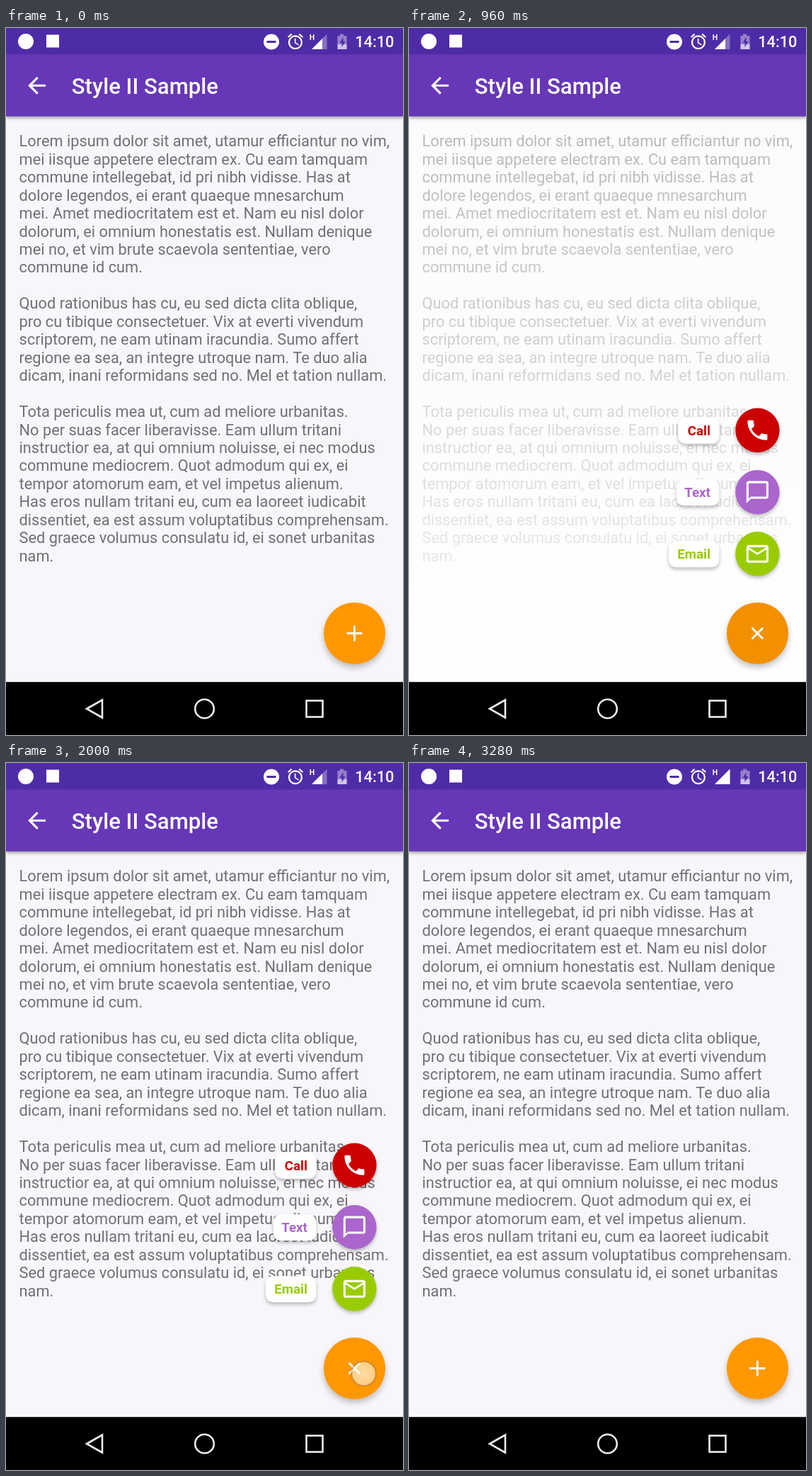
An HTML page that plays this animation: 561 by 998 pixels, repeating every 3.76 s.

```html
<!DOCTYPE html>
<html lang="en">
<head>
<meta charset="utf-8">
<title>Floating menu</title>
<style>
html, body { margin: 0; width: 100%; height: 100%; overflow: hidden; background: #f8f6fa; }
svg { display: block; width: 561px; height: 998px; font-family: Roboto, sans-serif; }
.bar { filter: drop-shadow(0 2px 2.5px rgba(0,0,0,.4)); }
.fab { filter: drop-shadow(0 5px 4px rgba(0,0,0,.24)); }
.lift { filter: drop-shadow(0 3px 2.5px rgba(0,0,0,.26)); }
.nav { fill: none; stroke: #ececec; stroke-width: 2.6; }
</style>
</head>
<body>
<svg viewBox="0 0 561 998">
  <defs>
    <linearGradient id="fade" x2="0" y2="1">
      <stop stop-color="#fff" stop-opacity=".49"/>
      <stop offset="1" stop-color="#fff" stop-opacity=".93"/>
    </linearGradient>
    <radialGradient id="dot">
      <stop stop-color="#fff" stop-opacity=".66"/>
      <stop offset=".8" stop-color="#fff" stop-opacity=".52"/>
      <stop offset=".87" stop-color="#a87c50" stop-opacity=".6"/>
      <stop offset="1" stop-color="#a87c50" stop-opacity="0"/>
    </radialGradient>
  </defs>
  <rect width="561" height="998" fill="#f8f6fa"/>
  <g id="copy" font-size="21.82" fill="#727074"></g>
  <rect id="veil" y="124" width="561" height="800" fill="url(#fade)"/>

  <rect class="bar" y="37" width="561" height="87.7" fill="#6637b6"/>
  <rect width="561" height="37.4" fill="#4f2ca7"/>
  <g fill="#fff">
    <circle cx="28" cy="19" r="11"/>
    <rect x="57" y="9.5" width="18" height="18"/>
    <circle cx="375" cy="19.5" r="11"/>
    <rect x="368.5" y="18" width="13" height="3" fill="#4f2ca7"/>
    <path transform="translate(395.6 5.8) scale(1.11)" d="M22 5.72l-4.6-3.86-1.29 1.53 4.6 3.86L22 5.72zM7.88 3.39L6.6 1.86 2 5.71l1.29 1.53 4.59-3.85zM12.5 8H11v6l4.75 2.85.75-1.23-4-2.37V8zM12 4c-4.97 0-9 4.03-9 9s4.02 9 9 9c4.97 0 9-4.03 9-9s-4.03-9-9-9zm0 16c-3.87 0-7-3.13-7-7s3.13-7 7-7 7 3.13 7 7-3.13 7-7 7z"/>
    <text x="428.8" y="17" font-size="10.5" font-weight="700">H</text>
    <path d="M432 30L453.5 8.5V30z" opacity=".32"/>
    <path id="signal"/>
    <path d="M468.5 11h3.500V8.500h5V11h4.500V30h-13z" opacity=".4"/>
    <path d="M468.500 23h13v7h-13z" opacity=".55"/>
    <path d="M476.500 13l-5 8h3v6l5-8h-3z" fill="#4f2ca7"/>
    <text x="548.5" y="27" font-size="21.82" font-weight="500" text-anchor="end">14:10</text>
    <path transform="translate(24.900 62.600) scale(1.558)" d="M20 11H7.83l5.590-5.590L12 4l-8 8 8 8 1.410-1.410L7.830 13H20z"/>
    <text x="92.800" y="93" font-size="31.160" font-weight="500">Style II Sample</text>
  </g>

  <g id="menu"></g>
  <circle class="fab" cx="492.500" cy="854.500" r="43.600" fill="#ff9800"/>
  <circle id="press" cx="492.500" cy="854.500" r="43.600"/>
  <path id="plus" d="M-11 0H11M0-11V11" stroke="#fff" stroke-width="2.900"/>
  <circle id="touch" r="19.500" fill="url(#dot)"/>

  <rect y="923.200" width="561" height="75"/>
  <path class="nav" d="M114 961L136 948.500V973.500z"/>
  <circle class="nav" cx="280.500" cy="961" r="13.300"/>
  <rect class="nav" x="424.500" y="949.500" width="23" height="23"/>
</svg>
<script>
const $ = id => document.getElementById(id);
const LOOP = 3760, STEP = 80;

const lines = `Lorem ipsum dolor sit amet, utamur efficiantur no vim,
mei iisque appetere electram ex. Cu eam tamquam
commune intellegebat, id pri nibh vidisse. Has at
dolore legendos, ei erant quaeque mnesarchum
mei. Amet mediocritatem est et. Nam eu nisl dolor
dolorum, ei omnium honestatis est. Nullam denique
mei no, et vim brute scaevola sententiae, vero
commune id cum.

Quod rationibus has cu, eu sed dicta clita oblique,
pro cu tibique consectetuer. Vix at everti vivendum
scriptorem, ne eam utinam iracundia. Sumo affert
regione ea sea, an integre utroque nam. Te duo alia
dicam, inani reformidans sed no. Mel et tation nullam.

Tota periculis mea ut, cum ad meliore urbanitas.
No per suas facer liberavisse. Eam ullum tritani
instructior ea, at qui omnium noluisse, ei nec modus
commune mediocrem. Quot admodum qui ex, ei
tempor atomorum eam, et vel impetus alienum.
Has eros nullam tritani eu, cum ea laoreet iudicabit
dissentiet, ea est assum voluptatibus comprehensam.
Sed graece volumus consulatu id, ei sonet urbanitas
nam.`.split('\n');
$('copy').innerHTML = lines.map((s, i) =>
  `<text x="18.500" y="${167.300 + i * 25.450}">${s}</text>`).join('');

// Label, colour, centre y, pill width, icon
const items = [
  ['Email', '#99cc00', 742.3, 71.5, 'M20 4H4c-1.1 0-2 .9-2 2v12c0 1.1.9 2 2 2h16c1.1 0 2-.9 2-2V6c0-1.1-.9-2-2-2zm0 14H4V8l8 5 8-5v10zm-8-7L4 6h16l-8 5z'],
  ['Text', '#aa66cc', 655.2, 60.5, 'M20 2H4c-1.1 0-2 .9-2 2v18l4-4h14c1.1 0 2-.9 2-2V4c0-1.1-.9-2-2-2zm0 14H6l-2 2V4h16v12z'],
  ['Call', '#cc0000', 567.8, 58, 'M6.62 10.79c1.44 2.83 3.76 5.14 6.59 6.59l2.2-2.2c.27-.27.67-.36 1.02-.24 1.12.37 2.33.57 3.57.57.55 0 1 .45 1 1V20c0 .55-.45 1-1 1-9.39 0-17-7.61-17-17 0-.55.45-1 1-1h3.5c.55 0 1 .45 1 1 0 1.25.2 2.45.57 3.57.11.35.03.74-.25 1.02l-2.2 2.2z']
];
$('menu').innerHTML = items.map(([name, color, , w, icon]) => `<g>
  <rect class="lift" x="${-54 - w}" y="-18" width="${w}" height="37" rx="10" fill="#fff"/>
  <text x="-66.500" y="7" font-size="18.700" font-weight="700" text-anchor="end" fill="${color}">${name}</text>
  <circle class="lift" r="31.200" fill="${color}"/>
  <path transform="scale(1.558) translate(-12 -12)" fill="#fff" d="${icon}"/></g>`).join('');
const rows = [...$('menu').children];

const ramp = (t, from, to) => Math.min(1, Math.max(0, (t - from) / (to - from)));
const ease = p => p * p * (3 - 2 * p);
const pulse = (t, a, b, c, d) => ramp(t, a, b) - ramp(t, c, d);

function draw(t) {
  $('veil').setAttribute('opacity', ramp(t, 680, 960) - ramp(t, 1800, 2000));

  rows.forEach((row, i) => {
    const p = ease(ramp(t, 680 + i * 30, 880 + i * 30)) - ease(ramp(t, 2000, 2200));
    row.setAttribute('transform', `translate(492.400 ${items[i][2]}) scale(${p})`);
    row.setAttribute('opacity', p);
  });

  const turn = 45 * (ease(ramp(t, 680, 920)) - ease(ramp(t, 2000, 2200)));
  $('plus').setAttribute('transform', `translate(492.400 854.500) rotate(${turn})`);
  $('press').setAttribute('opacity',
    .05 * (pulse(t, 680, 800, 960, 1360) + pulse(t, 2000, 2120, 2160, 2640)));

  const late = t > 1400;
  $('touch').setAttribute('transform', late ? 'translate(505.500 862)' : 'translate(489.500 850)');
  $('touch').setAttribute('opacity', pulse(t, 480, 560, 640, 760) + pulse(t, 1800, 1880, 2000, 2080));

  $('signal').setAttribute('d', t >= 3280 ? 'M432 30L453.500 8.500V30z' : 'M432 30L447 15V30z');
}

function tick(now) {
  draw(Math.floor(now % LOOP / STEP) * STEP);
  requestAnimationFrame(tick);
}
draw(0);
requestAnimationFrame(tick);
</script>
</body>
</html>
```
